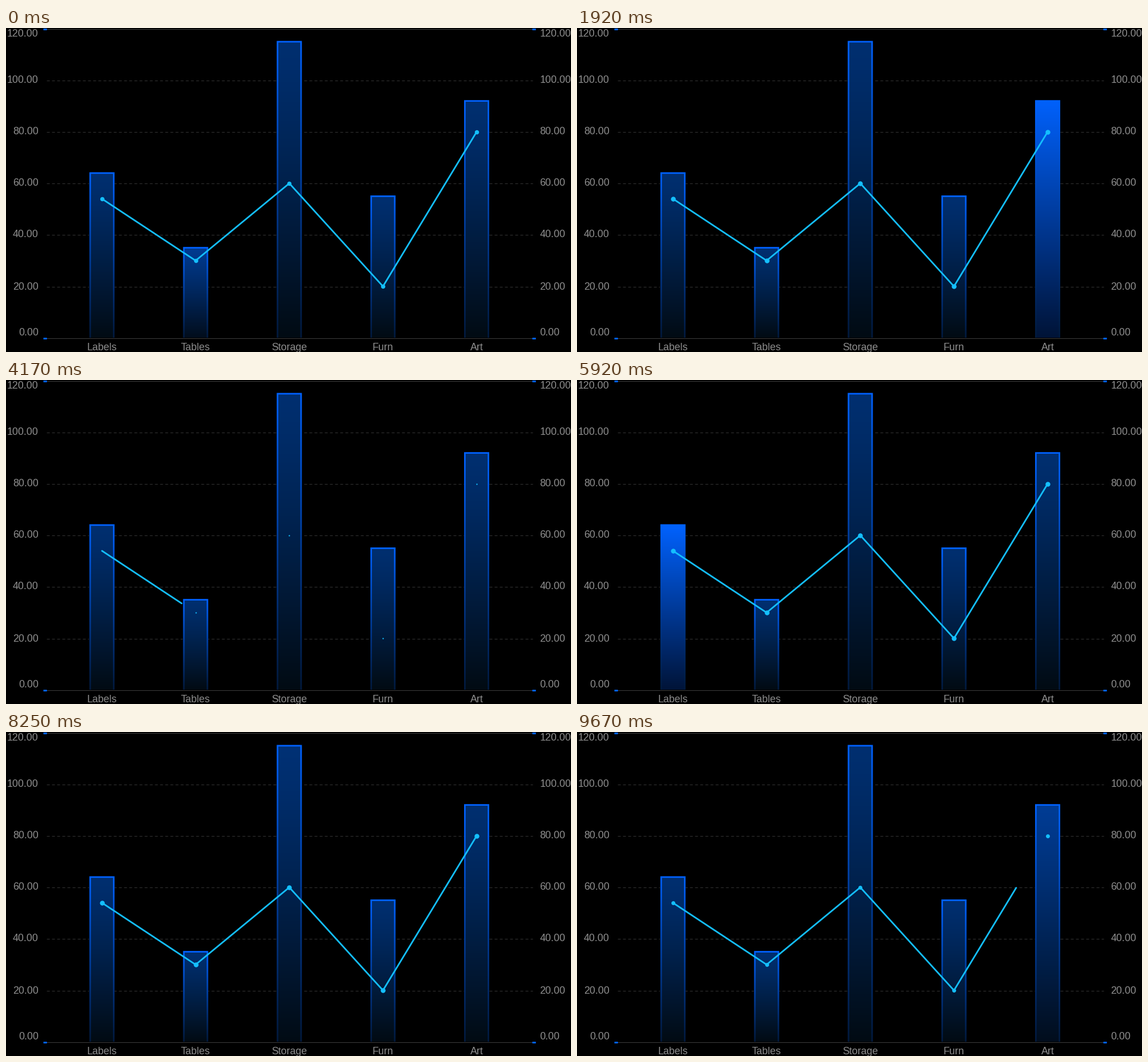
Animation of 988x567 px, one loop 9760 ms. Source, as a matplotlib script:

```python
import math

import matplotlib.pyplot as plt
import numpy as np
from matplotlib.animation import FuncAnimation

W, H, DPI = 988, 567, 64
PT = 72 / DPI                      # points per pixel
LOOP, INTERVAL = 9760, 40
TICK = 1000 / 12                   # the motion advances 12 times a second
LAST = 116

BLUE, CYAN, GREY = "#0062ff", "#14bfff", "#8e8e8e"
NAMES = ["Labels", "Tables", "Storage", "Furn", "Art"]
BARS = [64, 35, 115, 55, 92]
POINTS = [54, 30, 60, 20, 80]
HALF, EDGE = 20.6, 1.4             # half bar width, half border width
BOTTOM = 542

# (bar, tick) at which each highlight flashes
FLASHES = [(i, -6.8 + 9.6 * (i - 1)) for i in range(1, 5)]
FLASHES += [(i, 71 + 9.6 * i) for i in range(5)]
FADE = 10

# (start, first visible tick, last visible tick) of each line redraw
REDRAWS = [(110.78 - 117, 0, 12), (48.755, 50, 62), (110.78, 111, LAST)]


def y_of(value):
    return 542.3 - 4.507 * value


def x_of(i):
    return 167.8 + 163.8 * i


def ramp(top, bottom, n, power=1):
    s = np.linspace(0, 1, n)[:, None, None] ** power
    return (1 - s) * np.array(top) + s * np.array(bottom)


def cover(start, n, a, b):
    """Share of each of n pixels from start that lies between a and b."""
    p = start + np.arange(n)
    return np.clip(np.minimum(b, p + 1) - np.maximum(a, p), 0, 1)


def bar_box(i):
    left = math.floor(x_of(i) - HALF - EDGE)
    right = math.ceil(x_of(i) + HALF + EDGE)
    return left, right, math.floor(y_of(BARS[i]) - EDGE)


def bar_image(i, glow):
    left, right, top = bar_box(i)
    w, h = right - left, BOTTOM - top
    x, y = x_of(i), y_of(BARS[i])

    def box(grow):
        rows = cover(top, h, y - grow, BOTTOM)
        cols = cover(left, w, x - HALF - grow, x + HALF + grow)
        return np.outer(rows, cols)[..., None]

    normal = ramp((0, 47, 112), (2, 11, 19), h, 1.25)
    lit = ramp((0, 98, 255), (0, 20, 56), h)
    fill = normal + (lit - normal) * glow
    border = np.maximum(ramp((0, 98, 255), (0, 25, 60), h), fill)
    inner = box(-EDGE)
    img = fill * inner + border * (box(EDGE) - inner)
    return np.clip(img / 255, 0, 1)


def glow_of(i, k):
    level = 0
    for bar, start in FLASHES:
        u = (k - start) / FADE
        if bar == i and 0 <= u < 1:
            level = max(level, 0.5 + 0.5 * math.cos(math.pi * u))
    return level


def line_progress(k):
    for start, first, last in REDRAWS:
        if first <= k <= last:
            p = min(max((k - start) / 12, 0), 1)
            return 1 - (1 - p) ** 3
    return 1


fig = plt.figure(figsize=(W / DPI, H / DPI), dpi=DPI, facecolor="black")
ax = fig.add_axes([0, 0, 1, 1])
ax.axis("off")


def write(x, y, text, align):
    ax.text(x, y, text, ha=align, va="baseline", color=GREY,
            family="Liberation Sans", fontsize=17.7 * PT)


images = []
for i, name in enumerate(NAMES):
    left, right, top = bar_box(i)
    images.append(ax.imshow(bar_image(i, 0), extent=(left, right, BOTTOM, top),
                            origin="upper", interpolation="nearest",
                            aspect="auto", zorder=2))
    write(x_of(i), 563.5, name, "center")

ax.set_xlim(0, W)
ax.set_ylim(H, 0)

for value in range(0, 121, 20):
    y = math.floor(y_of(value) - 0.1) + 0.5
    label = f"{value:.2f}"
    base = {0: 538.4, 120: 14.8}.get(value, y + 5)
    write(56.7, base, label, "right")
    write(933.5, base, label, "left")
    if value in (0, 120):
        ax.plot([68, 922], [y, y], color="#3c3c3c", lw=PT, zorder=3)
        for x in (65, 919.5):
            ax.plot([x, x + 6], [y, y], color=BLUE, lw=3 * PT,
                    solid_capstyle="butt", zorder=4)
    else:
        ax.plot([71, 921], [y, y], color="#343434", lw=PT, zorder=1,
                dashes=(5, 4), dash_capstyle="butt")

px = np.array([x_of(i) for i in range(5)])
py = np.array([y_of(v) for v in POINTS])
line, = ax.plot([], [], color=CYAN, lw=2.8 * PT, zorder=5,
                solid_capstyle="round", solid_joinstyle="round")
dots = ax.scatter(px, py, s=1, color=CYAN, linewidths=0, zorder=6)


def draw(n):
    k = min(int((n * INTERVAL + 30) / TICK), LAST)
    if k in (8, 114):              # the motion stalls for one tick here
        k -= 1
    for i, img in enumerate(images):
        img.set_data(bar_image(i, glow_of(i, k)))

    e = line_progress(k)
    tip = min(68 + 854 * e, px[-1])
    if tip > px[0]:
        xs = np.append(px[px < tip], tip)
        line.set_data(xs, np.interp(xs, px, py))
    else:
        line.set_data([], [])
    dots.set_sizes([(8.4 * e * PT) ** 2])
    return [*images, line, dots]


anim = FuncAnimation(fig, draw, frames=LOOP // INTERVAL, interval=INTERVAL,
                     init_func=lambda: draw(0), repeat=True, repeat_delay=0)
plt.show()
```
